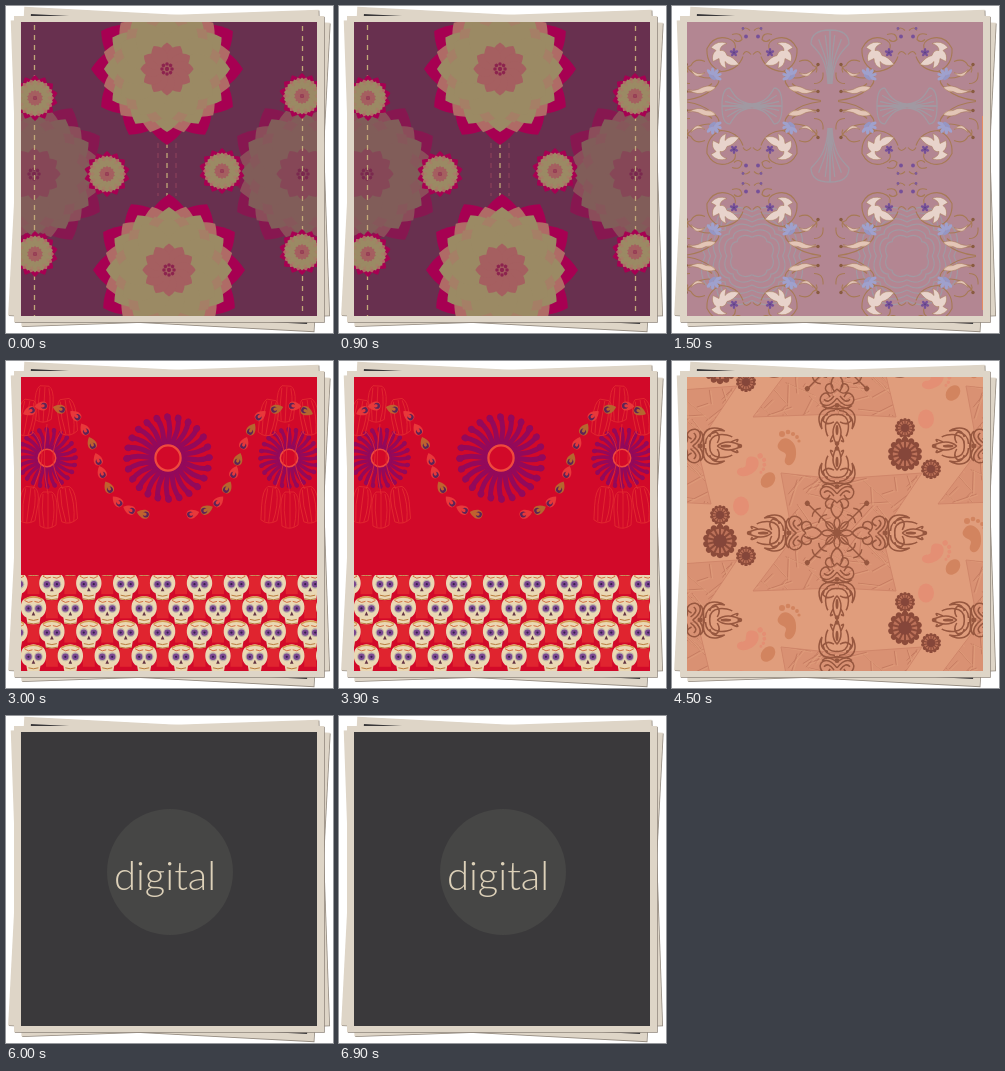
An HTML page that plays this animation: 327 by 327 pixels, repeating every 7500 ms.

```html
<!DOCTYPE html>
<html lang="en">
<head>
<meta charset="utf-8">
<title>Pattern cards</title>
<style>
html, body { margin: 0; width: 100%; height: 100%; overflow: hidden; background: #fff; }
svg { display: block; width: 100vw; height: 100vh; }
</style>
</head>
<body>
<svg id="stage" viewBox="0 0 327 327"></svg>
<script>
const HOLD = 1500;
const range = n => Array.from({ length: n }, (_, i) => i);
const repeat = (n, draw) => range(n).map(draw).join('');
const group = (attrs, body) => `<g ${attrs}>${body}</g>`;
const at = (x, y, body, extra = '') => group(`transform="translate(${x} ${y}) ${extra}"`, body);
const rect = (x, y, w, h, fill) => `<rect x="${x}" y="${y}" width="${w}" height="${h}" fill="${fill}"/>`;
const circle = (x, y, r, fill, extra = '') => `<circle cx="${x}" cy="${y}" r="${r}" fill="${fill}" ${extra}/>`;
const oval = (x, y, rx, ry, fill, extra = '') => `<ellipse cx="${x}" cy="${y}" rx="${rx}" ry="${ry}" fill="${fill}" ${extra}/>`;
const shape = (d, fill, extra = '') => `<path d="${d}" fill="${fill}" ${extra}/>`;
const line = (d, color, width = 1, extra = '') =>
  `<path d="${d}" fill="none" stroke="${color}" stroke-width="${width}" ${extra}/>`;
const spin = (n, body, offset = 0) =>
  repeat(n, i => group(`transform="rotate(${offset + i * 360 / n})"`, body));
const mirrorX = body => body + group('transform="scale(-1 1)"', body);
const mirrorXY = body => mirrorX(body) + group('transform="scale(1 -1)"', mirrorX(body));
const backdrop = color => rect(15, 16, 296, 294, color);

function randomizer(seed) {
  return () => (seed = (seed * 16807) % 2147483647) / 2147483647;
}

function sheet(cx, cy, w, h, turn) {
  return at(cx, cy,
    rect(-w / 2 + .8, -h / 2 + .8, w, h, '#948b80') +
    rect(-w / 2, -h / 2, w, h, '#ded5c7') +
    rect(-w / 2 + 7, -h / 2 + 7, w - 14, h - 14, '#3a393b'), `rotate(${turn})`);
}

// Layered flowers on plum
function petal(r, w, fill) {
  return shape(`M0 0C${w} ${-r * .4} ${w} ${-r * .76} 0 ${-r}C${-w} ${-r * .76} ${-w} ${-r * .4} 0 0`, fill);
}

function flower(r, n, rim) {
  const ring = (k, fill, offset) => spin(n, petal(r * k, r * k * 4.6 / n, fill), offset);
  return ring(1, '#a70052', 0) +
    ring(rim + .03, '#af6b66', 180 / n) +
    ring(rim, '#9b8a64', 0) +
    ring(rim - .1, '#a57f66', 180 / n) +
    ring(rim - .13, '#9b8a64', 0) +
    ring(.35, '#a55f60', 0) +
    spin(8, circle(0, -r * .066, r * .023, '#8c234e')) + circle(0, 0, r * .028, '#8c234e');
}

function plumScene() {
  const big = flower(76, 12, .83);
  const small = flower(23, 14, .8);
  const dashes = (x, y1, y2, color) => line(`M${x} ${y1}V${y2}`, color, 1.3, 'stroke-dasharray="5 5"');
  const smallSpots = [[29, 92], [296, 90], [101, 168], [216, 165], [29, 248], [296, 246]];
  return backdrop('#68304f') +
    [[28, 168], [297, 168]].map(([x, y]) => group('opacity=".5"', at(x, y, big))).join('') +
    dashes(152, 137, 190, '#873f59') + dashes(170, 137, 190, '#873f59') +
    dashes(161, 137, 190, '#c0a978') +
    dashes(28.5, 19, 310, '#c0a978') + dashes(296.5, 20, 310, '#c0a978') +
    at(161, 63, big) + at(163, 264, big) +
    smallSpots.map(([x, y]) => at(x, y, small)).join('');
}

// Scrolling foliage on mauve
const VEIN = '#a199a2';

function fan(w, h) {
  const ribs = [.25, .6, 1].map(k =>
    `M${2 * k} 0C${3 * k} ${-h * .45} ${w * k * .6} ${-h * .6} ${w * k} ${-h * (.96 - .22 * k)}`).join('');
  const rim = `M${w} ${-h * .74}C${w} ${-h * .93} ${w * .6} ${-h} 0 ${-h}`;
  return mirrorX(line(`${ribs}${rim}M0 0V${-h}`, VEIN, 1.3));
}

function rosette() {
  const loop = s => `M0 ${-34 * s}C${14 * s} ${-42 * s} ${27 * s} ${-34 * s} ${27 * s} ${-26 * s}` +
    `C${38 * s} ${-25 * s} ${42 * s} ${-12 * s} ${36 * s} 0`;
  return mirrorXY(line([.55, .7, .85, 1, 1.15, 1.3].map(loop).join(''), VEIN, 1.2));
}

function foliage() {
  const brown = '#a77a55';
  const leaf = 'M13 41Q22 44 27 38L26 45Q33 42 33 35L39 38Q41 31 36 27L41 24Q34 16 25 20' +
    'Q32 22 32 27Q27 26 25 32Q19 33 13 41Z';
  const curls = 'M9 33Q14 47 31 48Q46 42 45 25Q38 11 24 15Q15 18 17 25M20 11Q11 8 10 16Q14 20 18 16' +
    'M32 47Q37 58 52 53Q64 48 66 41M47 38Q57 34 61 42M40 60Q50 70 66 68' +
    'M34 50Q30 60 40 66Q50 75 69 77M61 42Q67 44 64 49M2 7Q7 2 10 7M1 31Q6 25 9 31M62 60Q72 60 71 49';
  const blossom = spin(5, oval(0, -2.4, 1.3, 2, '#765099')) + circle(0, 0, 1, '#5b4280');
  const bluebell = [-75, -38, 0, 38, 75].map(a =>
    group(`transform="rotate(${a})"`, oval(0, -5, 1.7, 4, '#9fa1cd'))).join('') + oval(0, 1, 4, 1.7, '#9596c4');
  const cream = (d, fill) => shape(d, fill, `stroke="${brown}" stroke-width=".5"`);
  return line(curls, brown, 1.1) +
    cream(leaf, '#e8d3cb') +
    cream('M36 64Q44 60 54 66Q60 68 64 66Q54 73 46 68Q41 69 36 64ZM47 49Q54 53 61 46Q56 58 47 49Z', '#e3c5b6') +
    at(18, 29, blossom) + at(39, 53, bluebell, 'rotate(-35)') +
    circle(6, 13, 1.9, '#765099') + circle(9, 5, 1.4, '#7d5a98') +
    circle(66, 41, 1.7, '#895c40') + circle(66, 68, 1.7, '#895c40');
}

function mauveScene() {
  const motif = mirrorXY(foliage());
  const tall = fan(19, 54);
  const wide = fan(18, 30);
  const fans = at(158, 78, tall) + at(158, 122, tall, 'rotate(180)') +
    [80, 235].map(x => at(x, 100, spin(2, wide, 90))).join('');
  const rosettes = [80, 235].map(x => at(x, 250, rosette())).join('');
  const motifs = repeat(9, i => at(80 + 155 * (i % 3), 17.5 + 155 * Math.floor(i / 3), motif));
  return backdrop('#b38692') + fans + rosettes + motifs + line('M310.5 110V304', '#e58b63', 1);
}

// Sunbursts, beads and skulls on red
function sunburst(r, n) {
  const curve = `M0 ${-r * .34}C${r * .05} ${-r * .6} ${r * .06} ${-r * .75} ${-r * .02} ${-r * .94}`;
  const ray = line(curve, '#93095b', r * .11, 'stroke-linecap="round"') +
    circle(-r * .01, -r * .91, r * .075, '#93095b');
  return spin(n, ray) + circle(0, 0, r * .38, '#93095b') +
    circle(0, 0, r * .28, '#d20929', `stroke="#ef493d" stroke-width="${r * .05}"`);
}

function bead(x, y, turn, tone) {
  const drop = shape('M0 -7.5C6 -2 6 5.5 0 5.5S-6 -2 0 -7.5Z', tone);
  return at(x, y, drop + circle(0, 2, 3, '#5c2458') + oval(0, .5, 1.6, 2.2, tone), `rotate(${turn})`);
}

// Beads point back along the string they hang on.
function garland(tones) {
  const points = [[24, 50], [36, 45], [54, 48], [70, 55], [79, 69], [86, 83], [92, 99],
    [96, 112], [103, 127], [112, 141], [124, 149], [138, 153]];
  return points.map(([x, y], i) => {
    const [x1, y1] = points[Math.max(i - 1, 0)];
    const [x2, y2] = points[Math.min(i + 1, points.length - 1)];
    const turn = Math.atan2(y2 - y1, x2 - x1) * 180 / Math.PI - 90;
    return bead(x - 162, y, turn, tones[i % tones.length]);
  }).join('');
}

function tulips() {
  const bloom = 'M-5 0Q-10 4 -9 20L-8 34Q0 39 8 33L9 16Q9 3 4 0ZM-5 2Q-7 18 -4 35M0 1V36M4 2Q8 18 4 35';
  const stroke = (x, y, turn) => at(x, y, line(bloom, '#e42d31', .8), `rotate(${turn})`);
  return stroke(-2, -72, 3) + stroke(-17, -58, 10) + stroke(18, -59, -8) +
    stroke(-16, 29, 7) + stroke(1, 34, 0) + stroke(18, 29, -8) +
    line('M-14 -26Q4 -8 -14 31M0 -34Q-6 5 1 36M14 -27Q-3 0 16 31', '#e42d31', .8);
}

function skull() {
  const eye = oval(5, -1, 4.3, 4.5, '#bdb3a6') + circle(5, -1, 3.2, '#7a4790') + circle(5, -1, 1.1, '#33214a');
  return shape('M-7 8C-14 5 -14 -6 -10 -10Q0 -17 10 -10C14 -6 14 5 7 8L6 14Q0 16 -6 14Z', '#ead8b4') +
    line('M-9 -10Q0 -15 9 -10', '#d59b52', 1.6) +
    mirrorX(eye + line('M1 -8L5 -7L9 -9', '#d16536', .9)) +
    shape('M0 2L-1.8 6H1.8Z', '#623445') +
    line('M-5 10Q0 12 5 10M-6 13.5Q0 15.5 6 13.5', '#b97c3d', 1);
}

function redScene() {
  const pitch = 36.9;
  const skulls = repeat(5, row => repeat(10, col =>
    at(9 + pitch * (col + row % 2 / 2 - .5), 200 + 24.2 * row,
      at(pitch / 2, 0, rect(-6, -9, 12, 18, '#e0242f')) + skull())));
  return backdrop('#d20929') +
    at(162, 97, sunburst(45, 24)) +
    [41, 283].map(x => at(x, 97, sunburst(31, 24) + tulips())).join('') +
    at(162, 0, garland(['#e8383a', '#e8383a', '#c0622f'])) +
    at(162, 0, garland(['#b5662f', '#e8383a']), 'scale(-1 1)') +
    group('clip-path="url(#band)"', skulls);
}

// Half-drop medallions on apricot
const UMBER = '#97573f';

function damaskArm() {
  const scrolls = 'M0 -14Q10 -22 3 -31M0 -29C7 -38 15 -30 10 -25Q5 -22 4 -28' +
    'M0 -38C11 -52 21 -42 15 -35Q10 -30 7 -37M2 -45Q10 -50 15 -45M3 -36Q9 -44 13 -39' +
    'M0 -49C21 -44 20 -61 15 -68Q18 -56 9 -54M0 -54C15 -53 12 -71 9 -75M2 -50Q12 -50 14 -60' +
    'Q10 -65 3 -61M0 -61Q8 -70 0 -84M4 -74Q9 -83 4 -79M0 -48H12';
  return mirrorX(line(scrolls, UMBER, 1.5)) +
    circle(0, -82, 2.2, UMBER) + oval(0, -69, 1.5, 5, UMBER) + circle(0, -45, 2.4, UMBER);
}

function medallion() {
  const arm = damaskArm();
  const diagonal = line('M0 -6V-43M-6 -20Q0 -25 6 -20M-6 -29Q0 -34 6 -29', UMBER, 1.4) + circle(0, -42, 2.6, UMBER);
  return spin(2, group('transform="scale(1 1.03)"', arm)) +
    spin(2, group('transform="scale(1 1.07)"', arm), 90) + spin(4, diagonal, 45) +
    spin(8, line('M0 -3Q6 -10 0 -16Q-6 -10 0 -3', UMBER, 1.3)) + circle(0, 0, 4, UMBER);
}

const PATCH_EDGE = 'M-56 -60L0 -54L85 -60L45 0L59 58L0 55L-84 58L-44 5Z';

function patch() {
  const random = randomizer(41);
  const spread = n => (random() - .5) * n;
  const strokes = repeat(110, () => {
    const x = spread(160), y = spread(118);
    return `M${x.toFixed(1)} ${y.toFixed(1)}l${spread(64).toFixed(1)} ${spread(56).toFixed(1)}`;
  });
  return shape(PATCH_EDGE, '#d99173') +
    group('clip-path="url(#patch)"', line(strokes, '#c67d62', 1) +
      line(strokes, '#e09d7c', .8, 'transform="translate(1.5 1)"')) +
    line(PATCH_EDGE, '#d0866a', 1);
}

function footprint(fill) {
  return shape('M-7 -9C-2 -16 9 -9 9 1C10 12 3 18 -1 14C-5 9 3 5 -4 2Q-13 -2 -7 -9Z', fill) +
    [[-5, -16, 3], [1, -18, 2.3], [6, -16, 2.1], [10, -13, 1.9], [12, -9, 1.6]]
      .map(([x, y, r]) => circle(x, y, r, fill)).join('');
}

function daisy(r) {
  return spin(14, oval(0, -r * .74, r * .2, r * .27, '#8c4b3a')) +
    circle(0, 0, r * .72, '#bd725a') +
    spin(14, line(`M0 0V${-r * .74}`, '#8c4b3a', r * .12)) +
    circle(0, 0, r * .4, '#85463a');
}

function apricotScene() {
  const tile = patch() + medallion() +
    at(-50, -83, footprint('#d2845f')) +
    at(-88, -67, footprint('#e48f74'), 'rotate(65) scale(.9)') +
    oval(-69, -53, 6.5, 8.5, '#d2845f', 'transform="rotate(38 -69 -53)"') +
    oval(-96, -27, 8, 9.5, '#e48f74') +
    at(-117, -18, daisy(10)) + at(-117, 8, daisy(17)) + at(-91, 23, daisy(10));
  const tiles = repeat(3, i => repeat(4, j =>
    at(165 + 185 * (i - 1), 172 + 174 * (j - 1) - (i === 1 ? 0 : 87), '<use href="#apricot"/>')));
  return backdrop('#e09d7c') + `<defs>${group('id="apricot"', tile)}</defs>` + tiles;
}

function titleScene() {
  return backdrop('#3a393b') + circle(164, 156, 63, '#464645') +
    '<text x="159" y="174" text-anchor="middle" font-family="Lato, sans-serif" font-weight="300" font-size="40" fill="#ddd1b9">digital</text>';
}

const scenes = [plumScene, mauveScene, redScene, apricotScene, titleScene];
const stage = document.getElementById('stage');
stage.innerHTML =
  `<defs><clipPath id="window">${rect(15, 16, 296, 294, '#000')}</clipPath>` +
  `<clipPath id="band">${rect(15, 214, 296, 96, '#000')}</clipPath>` +
  `<clipPath id="patch">${shape(PATCH_EDGE, '#000')}</clipPath></defs>` +
  sheet(163, 163, 306, 309, 3) + sheet(164, 162, 308, 306, -2) + sheet(163, 163, 310, 306, 0) +
  group('clip-path="url(#window)"', scenes.map(scene => group('class="scene"', scene())).join(''));

const layers = stage.querySelectorAll('.scene');
const start = performance.now();

function render(time) {
  const current = Math.floor(time / HOLD) % layers.length;
  layers.forEach((layer, i) => { layer.style.display = i === current ? '' : 'none'; });
}

function tick() {
  render(performance.now() - start);
  requestAnimationFrame(tick);
}
tick();
</script>
</body>
</html>
```
